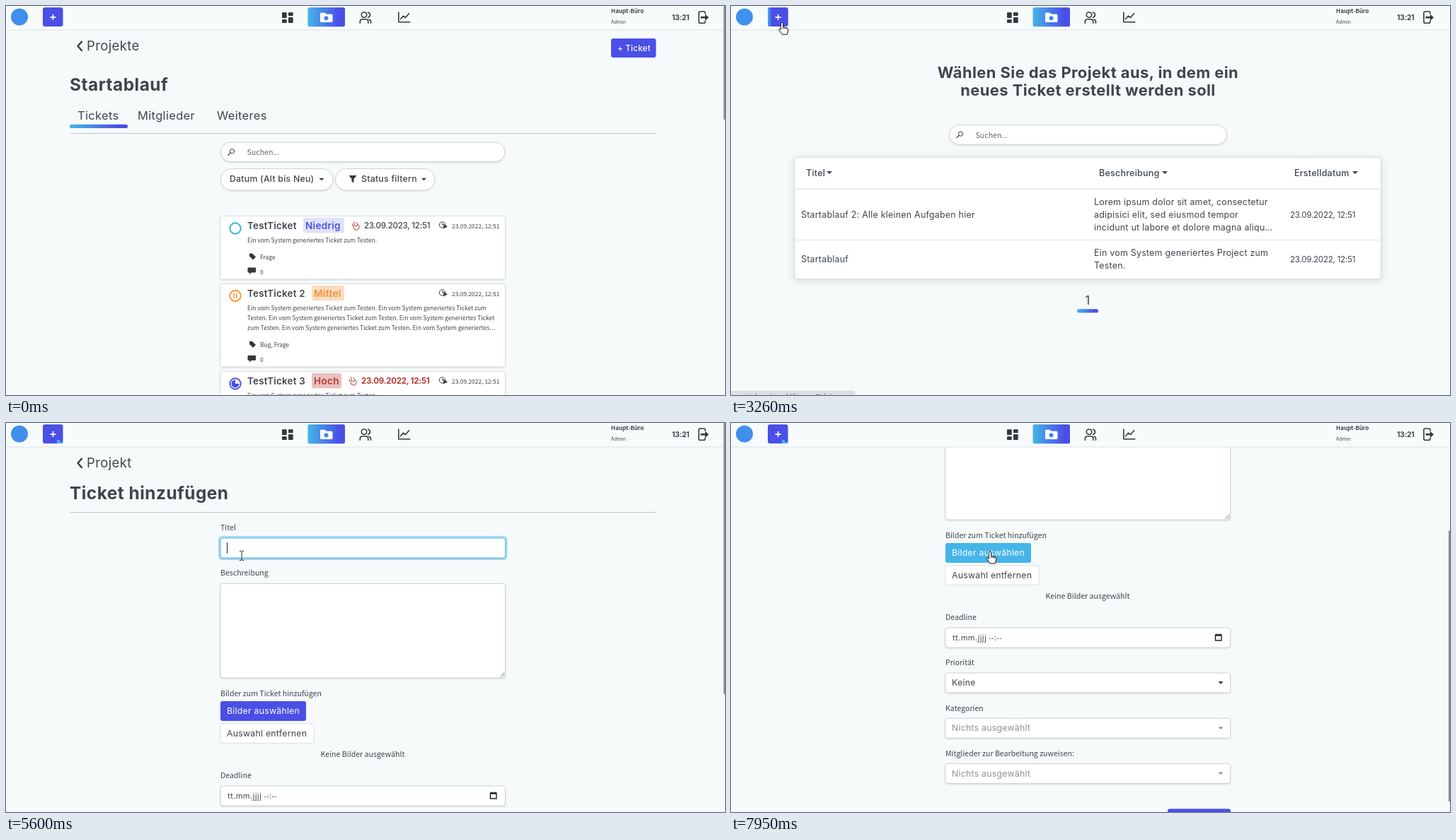
Animation of 1016x551 px, one loop 8 s. Source, as an HTML page:

```html
<!DOCTYPE html>
<html lang="de">
<head>
<meta charset="utf-8">
<title>Ticket erstellen</title>
<style>
html, body { margin: 0; width: 100%; height: 100%; overflow: hidden; background: #f7fafb; }
svg { display: block; width: 1016px; height: 551px; }
text { fill: #3f454b; white-space: pre; }
.m { font-family: Inter, sans-serif; letter-spacing: .02em; }
.n { font-family: Inter, sans-serif; letter-spacing: -.02em; }
.s { font-family: 'Noto Sans CJK JP', 'Noto Sans CJK SC', 'Noto Sans CJK', 'Noto Sans', sans-serif; }
.med { font-weight: 500; }
.semi { font-weight: 600; }
.bold { font-weight: 700; }
.white { fill: #fff; }
.grey { fill: #8d9296; }
.soft { filter: drop-shadow(0 1px 1px #0002); }
.lift { filter: drop-shadow(0 2px 6px #0002); }
.line { fill: none; stroke: #34393e; stroke-width: 1.6; stroke-linejoin: round; stroke-linecap: round; }
.ink { fill: #34393e; }
</style>
</head>
<body>
<svg id="stage" viewBox="0 0 1016 551"></svg>
<script>
const LOOP = 8000, INK = '#3f454b', BLUE = '#4a4fe6', SKY = '#45b5e9';

const text = (x, y, str, size, cls = 'm', attr = '') =>
  `<text x="${x}" y="${y}" font-size="${size}" class="${cls}" ${attr}>${str}</text>`;
const rect = (x, y, w, h, fill, r = 0, attr = '') =>
  `<rect x="${x}" y="${y}" width="${w}" height="${h}" rx="${r}" fill="${fill}" ${attr}/>`;
const path = (d, attr = 'class="line"') => `<path d="${d}" ${attr}/>`;
const group = (id, body) => `<g id="${id}">${body}</g>`;
const fade = (id, end) => `<linearGradient id="${id}"><stop offset="0" stop-color="${SKY}"/>` +
  `<stop offset="${end}" stop-color="${BLUE}"/></linearGradient>`;
const rule = (y, x1 = 90, x2 = 919, color = '#c3c7ca') => rect(x1, y, x2 - x1, 1, color);
const caret = (x, y, color = '#34393e', s = 3.5) =>
  path(`M${x - s} ${y - s / 2}h${2 * s}l${-s} ${s}z`, `fill="${color}"`);
const field = (y, h, id = '') =>
  rect(303, y, 402.5, h, '#fff', 3, `stroke="#cfd4d8" class="soft" ${id && `id="${id}"`}`);
const pill = (x, y, w, h) => rect(x, y, w, h, '#fff', h / 2, 'stroke="#cfd4d8" class="soft"');

const search = (x, y, w) => pill(x, y, w, 27.5) +
  `<circle cx="${x + 16}" cy="${y + 12.6}" r="3.1" class="line" style="stroke-width:1"/>` +
  path(`M${x + 13.7} ${y + 15}l-3.4 3.4`, 'class="line" style="stroke-width:1.1"') +
  text(x + 37, y + 18.2, 'Suchen...', 10.6, 's', 'style="fill:#62686e"');

const back = (label, id) =>
  rect(90, 43, 38, 27, '#dcdfe7', 13.5, `id="${id}Pill" opacity="0"`) +
  path('M107 50.5l-5.5 6.3 5.5 6.3', `class="line" id="${id}Arrow" style="stroke-width:2.3"`) +
  text(114, 63, label, 18.5, 'm', `id="${id}Text"`);

function header() {
  return rect(0, 0, 1016, 34, '#f8fbfc') + rule(33.5, 0, 1014, '#dde1e3') +
    '<circle cx="19" cy="15.5" r="12" fill="#3f8fec"/>' +
    rect(52, 2, 28.5, 27, BLUE, 3) +
    rect(52, 2, 28.5, 27, 'url(#edge)', 3, 'id="plusHot" opacity="0"') +
    path('M72 24h4v3h4.5v2h-8.5z', `fill="${SKY}" id="plusMark"`) +
    path('M66.5 11.8v8M62.5 15.8h8', 'stroke="#fff" stroke-width="1.7"') +
    [[390, 9, 8], [390, 19, 5], [399, 9, 5], [399, 16, 8]]
      .map(([x, y, h]) => rect(x, y, 6.7, h, '#34393e', 1)).join('') +
    rect(426.5, 2, 52.5, 27.3, 'url(#fade)', 2.5) +
    path('M444 11q0-1.5 1.5-1.5h5l2 2h7.5q1.5 0 1.5 1.5v8.5q0 1.5-1.5 1.5h-14.5q-1.5 0-1.5-1.5z', 'fill="#fff"') +
    '<circle cx="452.5" cy="17.2" r="3" fill="#4a80ea"/>' +
    '<circle cx="506" cy="12.5" r="3.7" class="line"/>' +
    path('M500.3 24.3v-2q0-3.500 3.500-3.500h4.500q3.500 0 3.500 3.500v2M511.500 9q3 .8 3 3.600t-3 3.600M513 19q2.500 .8 2.500 3.500v1.800') +
    path('M554.8 9v13.8h16M557.5 18.5l4-4.5 3 2.5 5-6') +
    path('M988 11v-1.200q0-2-2-2h-5q-2 0-2 2v12.500q0 2 2 2h5q2 0 2-2v-1.200') +
    path('M981.500 14.800h6.500v-3.300l5 4.700-5 4.700v-3.300h-6.500z', 'class="ink"') +
    text(855, 9.5, 'Haupt-Büro', 8.1, 's bold') + text(855, 25, 'Admin', 6.9, 's') +
    text(941, 20, '13:21', 10.3, 'n bold');
}

const clock = y => `<circle cx="616.5" cy="${y - .5}" r="4.2" class="line" style="stroke-width:1"/>` +
  path(`M616.5 ${y - 3}v2.5h2M618.5 ${y - 1}l5 2.8-5 2.8z`, 'class="ink" stroke="#34393e" stroke-width=".6"') +
  text(630, y + 4, '23.09.2022, 12:51', 8.45, 's');
const due = (x, y, year, cls, color) =>
  path(`M${x - 2} ${y - 5}v5a4 4 0 1 0 5-1l-1.5 2.5-3.5-1.5M${x - 4.5} ${y - 2}v3M${x + 1} ${y - 4}l1.5 2`, 'class="line" style="stroke:#b9574c;stroke-width:1.1"') +
  text(x + 12, y + 4, `23.09.${year}, 12:51`, 11.5, 'n ' + cls, `style="fill:${color}"`);
const meta = (y, tags) =>
  path(`M344 ${y - 4.5}h4l5 5-4 4-5-5z`, 'class="ink"') + text(359, y + 3.5, tags, 8.45, 's') +
  path(`M342.5 ${y + 15.5}h9.500q1 0 1 1v5q0 1-1 1h-5l-3 2.500v-2.500h-1.500q-1 0-1-1v-5q0-1 1-1z`, 'class="ink"') +
  text(359, y + 24.5, '0', 8.45, 's');
const badge = (x, y, w, label, bg, fg) =>
  rect(x, y - 10.5, w, 21.5, bg, 3) + text(x + 3, y + 5, label, 13.6, 'm semi', `style="fill:${fg}"`);
const card = (y, h, title) =>
  rect(303, y, 402.5, h, '#fff', 2, 'stroke="#dcdfe2" class="soft"') + text(341, y + 18, title, 13.3, 'm semi');
const ring = (y, color) => `<circle cx="324" cy="${y}" r="7.7" fill="none" stroke="${color}" stroke-width="1.9"/>`;

function ticketPage() {
  const line = 'Ein vom System generiertes Ticket zum Testen.';
  const lines = [line + ' Ein vom System generiertes Ticket zum',
    'Testen. ' + line + ' Ein vom System generiertes Ticket', 'zum Testen. ' + line + ' Ein vom System generiertes…'];
  return back('Projekte', 'list') +
    rect(855, 46, 63.5, 27, BLUE, 3, 'id="addBtn"') + text(864, 63.5, '+ Ticket', 11.6, 'm med white') +
    text(90, 119.5, 'Startablauf', 24.4, 'm bold') +
    text(101, 161, 'Tickets', 16.5) + text(186, 161, 'Mitglieder', 16.5) + text(298, 161, 'Weiteres', 16.5) +
    rect(90, 167.8, 82, 5.2, 'url(#fade)', 2.6) + rule(180) +
    search(303.5, 193, 401.5) +
    pill(303.5, 230.5, 158.5, 30.5) + text(316, 249.3, 'Datum (Alt bis Neu)', 12.3, 'm med') + caret(446, 245.5) +
    pill(465.5, 230.5, 140.5, 30.5) + path('M484.5 240h11l-4 5v5.5l-3-2v-3.5z', 'class="ink"') +
    text(502, 249.3, 'Status filtern', 12.3, 'm med') + caret(590.5, 245.5) +
    card(297.5, 89.5, 'TestTicket') + ring(315, '#2fb4d6') +
    badge(420, 310.5, 58, 'Niedrig', '#e0e2f8', BLUE) + due(494, 310.5, 2023, 'med', INK) + clock(310.5) +
    text(341, 334.5, line, 8.45, 's') + meta(355, 'Frage') +
    card(393.5, 117.5, 'TestTicket 2') + ring(410.5, '#f0952f') +
    path('M322.3 407v7M325.9 407v7', 'stroke="#f0952f" stroke-width="1.5"') +
    badge(432, 406.5, 46, 'Mittel', '#fcdcbf', '#f0902d') + clock(406.5) +
    lines.map((s, i) => text(341, 430.7 + 14 * i, s, 8.45, 's')).join('') + meta(479.5, 'Bug, Frage') +
    card(517.5, 90, 'TestTicket 3') + ring(535, BLUE) +
    path('M324 535v-5.5a5.5 5.5 0 1 0 5.5 5.5z', `fill="${BLUE}"`) +
    badge(432, 530.5, 42, 'Hoch', '#e9c1c1', '#b53a34') + due(490, 530.5, 2022, 'bold', '#b53a34') + clock(530.5) +
    text(341, 554.7, line, 8.45, 's');
}

function pickPage() {
  const mid = 'text-anchor="middle"', date = '23.09.2022, 12:51';
  const head = (x, label, tip, id) => text(x, 240.5, label, 12.5, 'm med', `id="${id}"`) + caret(tip, 236, INK, 4);
  const cell = (x, y, s) => text(x, y, s, 12.4);
  const day = y => text(790, y, date, 11.55, 'n');
  return text(504.5, 101.5, 'Wählen Sie das Projekt aus, in dem ein', 21.9, 'm bold', mid) +
    text(504.5, 127, 'neues Ticket erstellt werden soll', 21.9, 'm bold', mid) +
    search(308.5, 168.5, 392) +
    rect(90, 214.5, 828.5, 172, '#fff', 0, 'class="lift" stroke="#d9dddf"') +
    rect(90.5, 260, 828, 71.5, '#ebeff0', 0, 'id="rowAHot"') + rect(90.5, 332, 828, 54, '#ebeff0', 0, 'id="rowBHot"') +
    rule(258.5, 90, 919, '#d5d9dc') + rule(331, 90, 919, '#dfe2e5') +
    head(106, 'Titel', 139, 'headTitle') + head(520, 'Beschreibung', 613, 'headText') + head(796, 'Erstelldatum', 882, 'headDate') +
    group('rowA', cell(99, 299.5, 'Startablauf 2: Alle kleinen Aufgaben hier') +
      cell(513, 281.5, 'Lorem ipsum dolor sit amet, consectetur') +
      cell(513, 299.5, 'adipisici elit, sed eiusmod tempor') +
      cell(513, 317.5, 'incidunt ut labore et dolore magna aliqu…') + day(299.5)) +
    group('rowB', cell(99, 363, 'Startablauf') + cell(513, 354, 'Ein vom System generiertes Project zum') +
      cell(513, 372, 'Testen.') + day(363)) +
    text(504, 423, '1', 17, 'm', mid) + rect(489, 429.3, 30, 5.3, 'url(#fade)', 2.6);
}

function formPage() {
  const label = (y, s) => text(303, y, s, 10.6, 's');
  const select = (y, s, cls, color) => field(y, 28) + text(312, y + 18, s, 12.3, 'm ' + cls) + caret(692, y + 14, color);
  return back('Projekt', 'form') +
    text(90, 108, 'Ticket hinzufügen', 24.4, 'm bold') + rule(126) +
    label(152, 'Titel') +
    rect(301.5, 161.5, 405.5, 31, 'none', 4, 'id="glow" stroke="#a9dcf4" stroke-width="3"') +
    field(163, 28, 'titleBox') + text(312.5, 181.5, '', 10.6, 's', 'id="typed"') + rect(312, 169, 1, 16, '#222', 0, 'id="bar"') +
    label(216, 'Beschreibung') + field(227.5, 133.5) + path('M698.5 359.5l6-6M702 359.5l2.5-2.5', 'stroke="#777" fill="none"') +
    label(386.5, 'Bilder zum Ticket hinzufügen') +
    rect(303, 394, 121, 28, BLUE, 3, 'id="fileBtn"') + text(312, 411.8, 'Bilder auswählen', 12.3, 'm white') +
    rect(303, 426, 132, 27.5, '#fff', 2, 'stroke="#dcdfe2"') + text(312, 443.8, 'Auswahl entfernen', 12.3) +
    text(504, 473, 'Keine Bilder ausgewählt', 10.6, 's', 'text-anchor="middle"') +
    label(503, 'Deadline') + field(514, 28) +
    text(313, 532, 'tt.mm.jjjj --:--', 10.6, 's', 'letter-spacing=".3"') +
    path('M684.5 524h8.5v8h-8.5zM684.5 525h8.5M686.5 522.5v1M691 522.5v1', 'fill="none" stroke="#222" stroke-width="1.4"') +
    label(567, 'Priorität') + select(578, 'Keine', '', '#222') +
    label(631.5, 'Kategorien') + select(642.3, 'Nichts ausgewählt', 'grey', '#8d9296') +
    label(696, 'Mitglieder zur Bearbeitung zuweisen:') + select(706.5, 'Nichts ausgewählt', 'grey', '#8d9296') +
    rect(617, 770.5, 89, 28, BLUE, 3);
}

const outline = 'fill="#fff" stroke="#111" stroke-width="1" stroke-linejoin="round"';
const pointers =
  group('arrow', path('M0 0V14.5L3.4 11.3 5.6 16.5 7.8 15.5 5.7 10.5H10.3z', outline)) +
  group('hand', path('M-1.6 1.2Q0-1 1.6 1.2V6.5L7.5 8Q9 8.5 8.8 10.5L7.5 17H0L-4.5 10.5Q-4.5 8.5-1.6 10.2z', outline) +
    path('M1.6 6.5v3M4.1 7.2v2.5M6.5 7.8v2.2', 'stroke="#111" stroke-width=".8"')) +
  group('beam', path('M-3-6.5h2l1 1 1-1h2M0-5.5v11M-3 6.5h2l1-1 1 1h2', 'fill="none" stroke="#222"'));

document.getElementById('stage').innerHTML =
  `<defs>${fade('fade', .85)}${fade('edge', .2)}</defs>` +
  rect(0, 0, 1016, 551, '#f7fafb') +
  group('tickets', ticketPage()) + group('pick', pickPage()) + group('form', formPage()) + header() +
  group('status', rect(-4, 545, 130, 10, '#dcdfe2', 3, 'id="statusBox"') +
    text(23, 555.5, 'Link zur Ansicht', 8, 's', 'id="statusText"')) +
  rect(1014, 0, 3, 161, '#8d8f91', 1, 'id="thumb"') + group('pointer', pointers);

const el = {};
document.querySelectorAll('[id]').forEach(n => { el[n.id] = n; });

// Rows: time, then values
const pointerPath = [[130, 955, 508], [450, 880, 330], [780, 783, 125], [930, 815, 88], [1070, 872, 66], [1280, 885, 60],
  [1480, 880, 60], [1700, 540, 75], [1900, 130, 62], [1960, 107, 52], [2030, 97, 37], [2240, 74, 22], [2600, 70, 21], [3050, 73, 23],
  [3260, 72, 23], [3350, 76, 40], [3920, 167, 342], [4120, 191, 376], [4520, 191, 376], [5120, 333, 188],
  [6590, 333, 188], [6790, 337, 224], [7330, 337, 224], [7400, 340, 229], [7640, 355, 203], [7950, 366, 182]];
const scrollPath = [[6850, 0], [6930, 55], [7060, 125], [7200, 200], [7330, 224]];
const pointerKinds = [[130, 'arrow'], [1000, 'hand'], [1500, 'arrow'], [1920, 'hand'], [2000, 'arrow'], [2240, 'hand'],
  [3370, 'arrow'], [3755, 'hand'], [4520, 'arrow'], [5000, 'beam'], [7200, 'hand']];
const pages = [[0, 'tickets'], [3130, 'pick'], [4520, 'form']];
const typing = [[0, ''], [6060, 'T'], [6320, 'Te'], [6390, 'Tes'], [6590, 'Test']];

const clamp = v => Math.max(0, Math.min(1, v));
const ramp = (t, a, b) => clamp((t - a) / (b - a));
const hold = (t, a, b, c, d) => Math.min(ramp(t, a, b), 1 - ramp(t, c, d));
const step = (rows, t) => rows.reduce((v, r) => (t >= r[0] ? r[1] : v), null);
const mix = (a, b, p) => `color-mix(in srgb, ${b} ${p * 100}%, ${a})`;
const show = (id, on) => { el[id].style.display = on ? '' : 'none'; };

function along(rows, t) {
  const i = rows.findIndex(r => r[0] > t);
  if (i < 0) return rows[rows.length - 1].slice(1);
  if (i === 0) return rows[0].slice(1);
  const a = rows[i - 1], b = rows[i], p = ramp(t, a[0], b[0]);
  return a.slice(1).map((v, k) => v + (b[k + 1] - v) * p);
}

function heat(row, p) {
  el[row + 'Hot'].style.opacity = p;
  el[row].querySelectorAll('text').forEach(n => { n.style.fill = mix(INK, BLUE, p); });
}

function render(t) {
  const page = step(pages, t), kind = step(pointerKinds, t), [scroll] = along(scrollPath, t);
  for (const [, id] of pages) show(id, id === page);
  for (const id of ['arrow', 'hand', 'beam']) show(id, id === kind);
  el.pointer.setAttribute('transform', `translate(${along(pointerPath, t)})`);

  el.addBtn.style.fill = mix(BLUE, SKY, hold(t, 1000, 1200, 1500, 1700));
  const link = hold(t, 1890, 1960, 2050, 2200);
  el.listPill.style.opacity = link;
  el.listArrow.style.stroke = mix('#34393e', BLUE, link);
  el.listText.style.fill = mix(INK, BLUE, link * .5);
  el.plusHot.style.opacity = hold(t, 2200, 2420, 3360, 3500);
  show('plusMark', t > 3500);

  el.headTitle.style.fill = mix(INK, BLUE, .35 * ramp(t, 3670, 3750));
  heat('rowA', hold(t, 3740, 3780, 3890, 3960));
  heat('rowB', ramp(t, 3890, 3990));

  el.form.setAttribute('transform', `translate(0 ${-scroll})`);
  const focus = ramp(t, 5190, 5400), word = step(typing, t);
  el.glow.style.opacity = focus;
  el.titleBox.style.stroke = mix('#cfd4d8', '#5cbcec', focus);
  if (el.typed.textContent !== word) el.typed.textContent = word;
  el.bar.setAttribute('x', 312 + (word ? el.typed.getComputedTextLength() : 0));
  show('bar', t >= 5190 && !(t >= 5920 && t < 6060) && !(t >= 7090 && t < 7590));
  el.fileBtn.style.fill = mix(BLUE, SKY, ramp(t, 7600, 7800));

  const wide = t >= 2310;
  show('status', (t >= 1140 && t < 1620) || (t >= 1960 && t < 3480));
  el.statusBox.setAttribute('width', wide ? 179.5 : 130);
  const note = wide ? 'Link zur Auswahl für neue Tickets' : 'Link zur Projektliste';
  if (el.statusText.textContent !== note) el.statusText.textContent = note;

  show('thumb', page !== 'pick');
  el.thumb.setAttribute('y', page === 'form' ? scroll * .68 : 0);
  el.thumb.setAttribute('height', page === 'form' ? 384 : 161);
}

const start = performance.now();
function tick() {
  render((performance.now() - start) % LOOP);
  requestAnimationFrame(tick);
}
tick();
</script>
</body>
</html>
```
